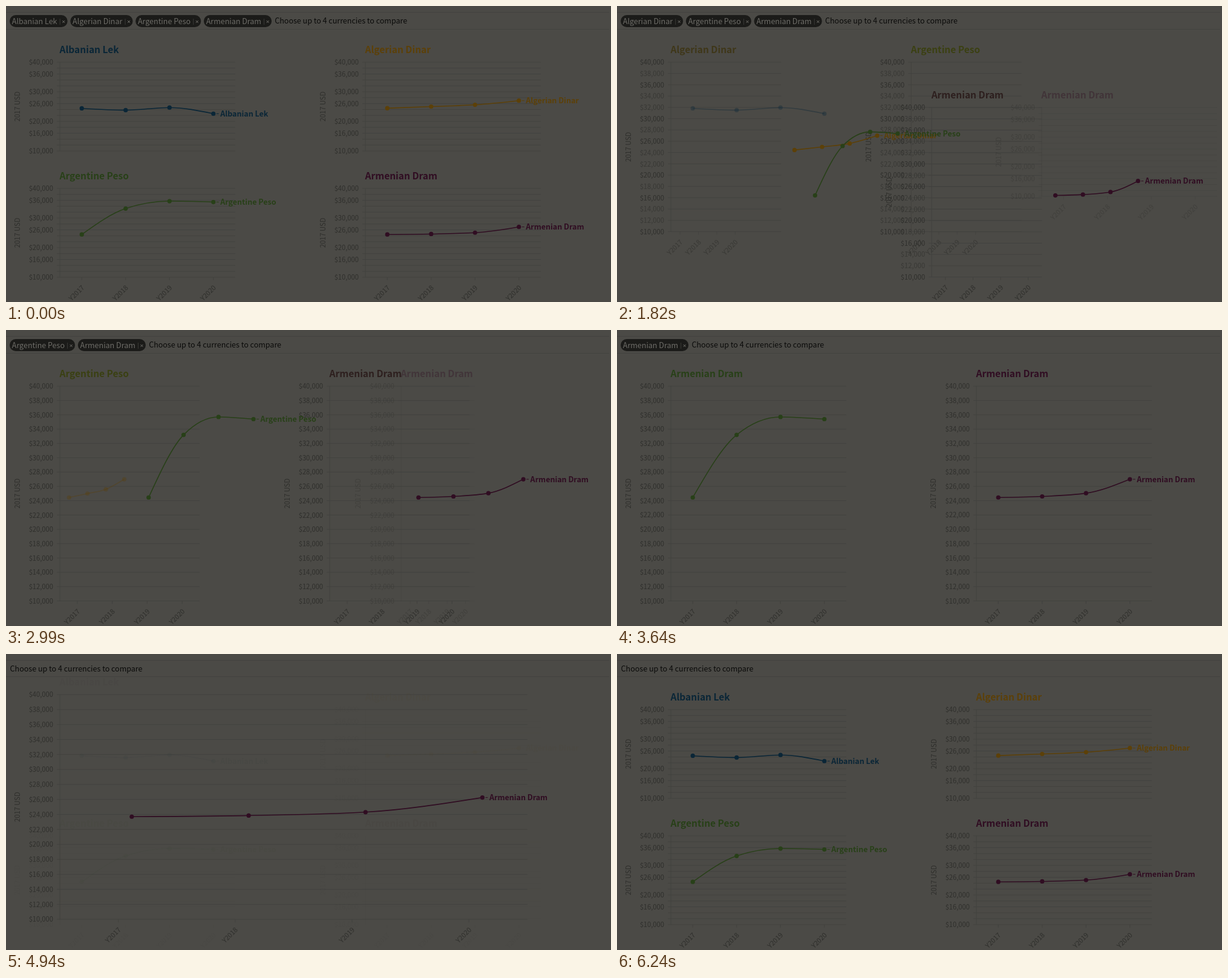
An HTML page with a canvas that plays this animation: 1000 px wide and 490 px high, repeating every 7.02 s.

```html
<!DOCTYPE html>
<html lang="en">
<head>
<meta charset="utf-8">
<title>Currency comparison</title>
<style>
  html, body { margin: 0; height: 100%; overflow: hidden; background: #4b4a46; }
  canvas { display: block; }
</style>
</head>
<body>
<canvas id="stage" width="1000" height="490"></canvas>
<script>
const ctx = document.getElementById('stage').getContext('2d');
const FAMILY = '"Noto Sans CJK JP", "Noto Sans CJK SC", "Noto Sans CJK", Lato, sans-serif';
const BG = '#4b4a46', INK = '#0b0b0a', TICK = '#2f2f2c', GRID = '#42423f', PILL = '#1b1b19', PILL_TEXT = '#6e6d68';
const LOOP = 7020, STEP = 130, DURATION = 750, BOTTOM = 448.5;

const series = [
  { name: 'Albanian Lek',   rgb: [10, 38, 55], values: [24.4, 23.8, 24.65, 22.6] },
  { name: 'Algerian Dinar', rgb: [92, 64, 8],  values: [24.45, 25, 25.6, 27] },
  { name: 'Argentine Peso', rgb: [40, 64, 24], values: [24.45, 33.2, 35.7, 35.4] },
  { name: 'Armenian Dram',  rgb: [48, 13, 34], values: [24.45, 24.6, 25.05, 27] }
];
const sparseTicks = [40, 36, 30, 26, 20, 16, 10];

// Each state lists the charts shown; `start` begins the move, `pillsAt` updates the header.
const states = [
  { shown: [0, 1, 2, 3], pills: 4, start: 0, pillsAt: 0 },
  { shown: [1, 2, 3], pills: 3, start: 1406, pillsAt: 1406 },
  { shown: [2, 3], pills: 2, start: 2573, pillsAt: 2573 },
  { shown: [3], pills: 1, start: 3626, pillsAt: 3626 },
  { shown: [0, 1, 2, 3], pills: 0, start: 4773, pillsAt: 4900 }
];

const lerp = (a, b, p) => a + (b - a) * p;
const easeInOut = t => t < 0.5 ? 4 * t ** 3 : 1 - 4 * (1 - t) ** 3;
const mix = (a, b, p) => `rgb(${a.map((v, i) => Math.round(lerp(v, b[i], p)))})`;
const lastStarted = (t, key) => states.reduce((found, s, i) => t >= s[key] ? i : found, 0);

function layout(state, i) {
  const n = state.shown.length, cols = n === 4 ? 2 : n, cell = 1010 / cols;
  const row = Math.floor(i / cols), lift = state.pills ? 0 : 1;
  const y = (n === 1 ? 66 : row ? 302 : 93) - lift;
  return {
    x: 89 + (i % cols) * cell, y, w: cell - 215,
    h: n === 4 ? 147 : BOTTOM - y,
    title: n > 1 ? 1 : 0, dense: n < 4 ? 1 : 0, xLabels: n < 4 || row ? 1 : 0
  };
}

function blend(a, b, p) {
  const g = {};
  for (const key in a) g[key] = lerp(a[key], b[key], p);
  return g;
}

function text(str, x, y, size, color, { weight = 400, align = 'left', angle = 0 } = {}) {
  ctx.save();
  ctx.translate(x, y);
  ctx.rotate(angle);
  ctx.font = `${weight} ${size}px ${FAMILY}`;
  ctx.textAlign = align;
  ctx.fillStyle = color;
  ctx.fillText(str, 0, 0);
  ctx.restore();
}

function line(x1, y1, x2, y2, color, width = 1) {
  ctx.beginPath();
  ctx.moveTo(x1, y1);
  ctx.lineTo(x2, y2);
  ctx.strokeStyle = color;
  ctx.lineWidth = width;
  ctx.stroke();
}

function withAlpha(alpha, draw) {
  if (alpha <= 0) return;
  ctx.save();
  ctx.globalAlpha *= alpha;
  draw();
  ctx.restore();
}

function drawFacet(g, name, color, labelWidth = g.w) {
  const bottom = g.y + g.h;
  for (let v = 10; v <= 40; v += 2) {
    const y = bottom - (v - 10) / 30 * g.h;
    line(g.x - 5, y, g.x + g.w, y, GRID);
    withAlpha(sparseTicks.includes(v) ? 1 : g.dense, () =>
      text(`$${v},000`, g.x - 11, y + 4.2, 11.2, TICK, { align: 'right' }));
  }
  line(g.x, g.y, g.x, bottom, GRID);
  text('2017 USD', g.x - 66.5, g.y + g.h / 2, 11.2, TICK, { align: 'center', angle: -Math.PI / 2 });
  withAlpha(g.title, () => text(name, g.x - 0.5, g.y - 15, 15.5, color, { weight: 700 }));
  withAlpha(g.xLabels, () => {
    for (let i = 0; i < 4; i++) {
      const x = g.x + labelWidth * (i + 0.5) / 4;
      line(x, bottom, x, bottom + 5, GRID);
      text('Y' + (2017 + i), x + 5, bottom + 18, 11.2, TICK, { align: 'right', angle: -Math.PI / 4 });
    }
  });
}

function pointsIn(g, values) {
  return values.map((v, i) => [g.x + g.w * (i + 0.5) / 4, g.y + g.h * (40 - v) / 30]);
}

// Monotone cubic through evenly spaced points.
function monotonePath(pts) {
  const dx = pts[1][0] - pts[0][0];
  const s = pts.slice(1).map((pt, i) => (pt[1] - pts[i][1]) / dx);
  const inner = (a, b) => (Math.sign(a) + Math.sign(b)) * Math.min(Math.abs(a), Math.abs(b), Math.abs(a + b) / 4);
  const m1 = inner(s[0], s[1]), m2 = inner(s[1], s[2]);
  const m = [(3 * s[0] - m1) / 2, m1, m2, (3 * s[2] - m2) / 2];
  ctx.beginPath();
  ctx.moveTo(...pts[0]);
  for (let i = 0; i < 3; i++) {
    const [x0, y0] = pts[i], [x1, y1] = pts[i + 1], d = dx / 3;
    ctx.bezierCurveTo(x0 + d, y0 + m[i] * d, x1 - d, y1 - m[i + 1] * d, x1, y1);
  }
}

function drawSeries(s, pts, labelled) {
  const color = mix(s.rgb, s.rgb, 0);
  monotonePath(pts);
  ctx.strokeStyle = color;
  ctx.lineWidth = 1.6;
  ctx.stroke();
  ctx.fillStyle = color;
  for (const [x, y] of pts) {
    ctx.beginPath();
    ctx.arc(x, y, 3.6, 0, Math.PI * 2);
    ctx.fill();
  }
  if (!labelled) return;
  const [x, y] = pts[3];
  line(x + 5, y, x + 9, y, color);
  text(s.name, x + 11.5, y + 4.7, 12.5, color, { weight: 700 });
}

function drawCharts(from, to, p) {
  const nA = from.shown.length, nB = to.shown.length;
  for (let i = 0; i < Math.max(nA, nB); i++) {
    const a = i < nA && layout(from, i), b = i < nB && layout(to, i);
    const before = series[from.shown[i]], after = series[to.shown[i]];
    if (a && b) {
      drawFacet(blend(a, b, p), after.name, mix(before.rgb, after.rgb, p),
        a.xLabels ? undefined : b.w);
    } else if (a) {
      const end = layout(to, nB - 1);
      const g = { ...a, x: lerp(a.x, end.x, p), y: lerp(a.y, end.y, p) };
      withAlpha(1 - p, () => drawFacet(g, before.name, mix(before.rgb, before.rgb, 0)));
    } else {
      withAlpha(p, () => drawFacet(b, after.name, mix(after.rgb, after.rgb, 0)));
    }
  }
  series.forEach((s, id) => {
    const i = from.shown.indexOf(id), j = to.shown.indexOf(id);
    const a = i >= 0 && pointsIn(layout(from, i), s.values);
    const b = j >= 0 && pointsIn(layout(to, j), s.values);
    if (a && b) drawSeries(s, a.map((pt, k) => pt.map((v, c) => lerp(v, b[k][c], p))), true);
    else if (a) withAlpha(1 - p, () => drawSeries(s, a, false));
    else if (b) withAlpha(p, () => drawSeries(s, b, true));
  });
}

function drawHeader(state) {
  const base = state.pills ? 38.5 : 37.5;
  line(0, 10.5, 997, 10.5, GRID);
  line(0, base, 997, base, GRID);
  let x = 6;
  for (const { name } of series.slice(4 - state.pills)) {
    ctx.font = `400 12.5px ${FAMILY}`;
    const w = ctx.measureText(name).width + 21;
    ctx.fillStyle = PILL;
    ctx.beginPath();
    ctx.roundRect(x, 15, w, 20, 10);
    ctx.fill();
    text(name, x + 3.8, 29.5, 12.5, PILL_TEXT);
    line(x + w - 12.5, 21, x + w - 12.5, 31, '#3b3b38');
    const cx = x + w - 6.5;
    line(cx - 2, 24, cx + 2, 28, PILL_TEXT);
    line(cx - 2, 28, cx + 2, 24, PILL_TEXT);
    x += w + 4.6;
  }
  text('Choose up to 4 currencies to compare', x + 0.6, 29.2, 12.5, INK);
}

function render(now) {
  const t = Math.floor(now % LOOP / STEP) * STEP;
  const k = lastStarted(t, 'start');
  const to = states[k], from = states[Math.max(0, k - 1)];
  const p = k ? easeInOut(Math.min(1, (t - to.start) / DURATION)) : 1;
  ctx.fillStyle = BG;
  ctx.fillRect(0, 0, 1000, 490);
  drawCharts(from, to, p);
  drawHeader(states[lastStarted(t, 'pillsAt')]);
}

const origin = performance.now();
function tick() {
  render(performance.now() - origin);
  requestAnimationFrame(tick);
}
tick();
</script>
</body>
</html>
```
